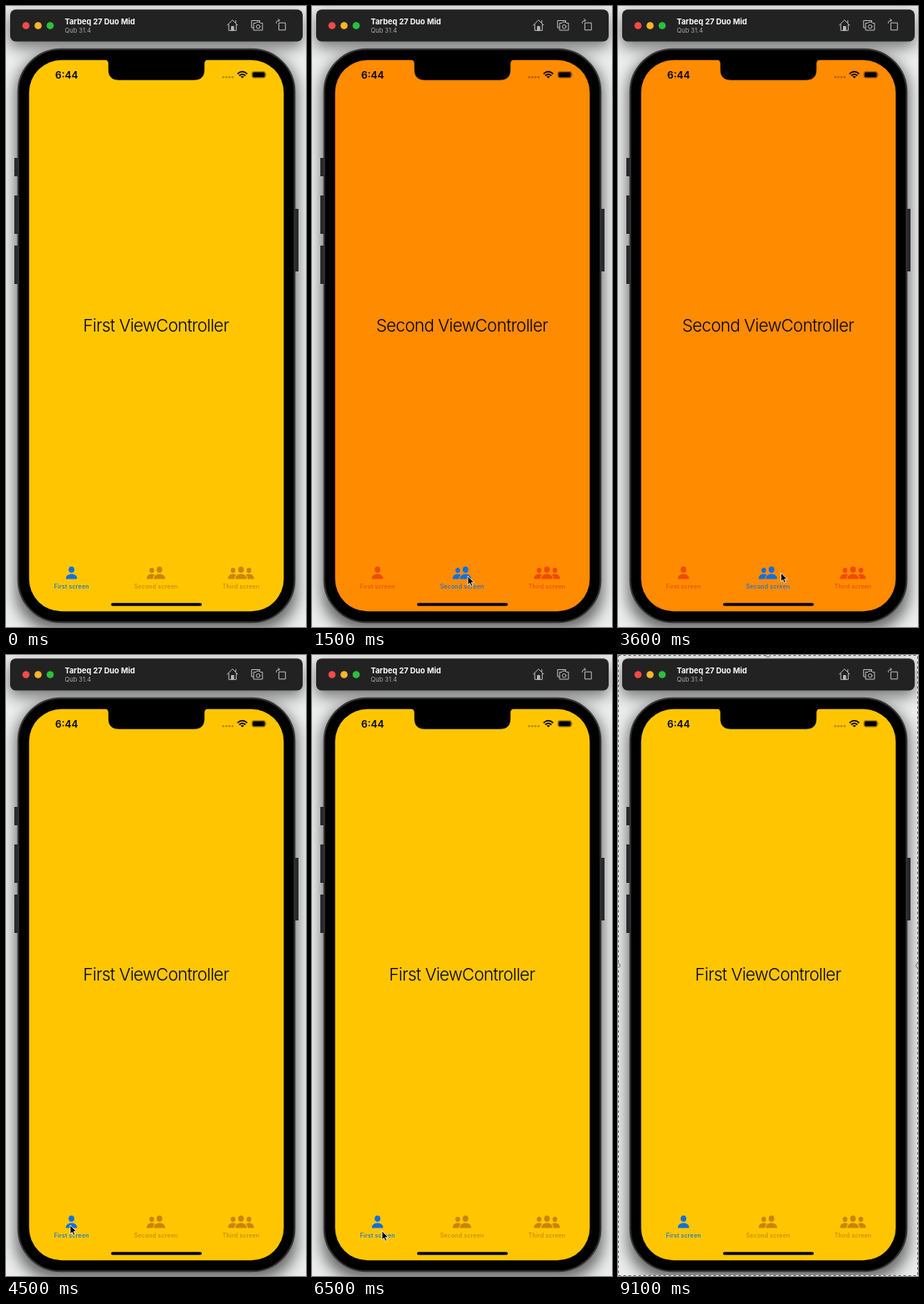
An HTML page that plays this animation: 360 by 744 pixels, repeating every 9.6 s.

```html
<!DOCTYPE html>
<html lang="en">
<head>
<meta charset="utf-8">
<title>Tab bar demo</title>
<style>
  html, body { margin: 0; width: 100%; height: 100%; overflow: hidden; background: #eceded; }
  svg { display: block; width: 360px; height: 744px; font-family: Inter, Roboto, sans-serif; }
  .screen { fill: var(--bg); }
  .heading { font-size: 20.5px; font-weight: 300; letter-spacing: -.029em; text-anchor: middle; }
  .tab { fill: var(--off); font-size: 7px; font-weight: 500; letter-spacing: .2px; text-anchor: middle; }
  .tab.active { fill: var(--on); }
  .tools { fill: none; stroke: #b9b9b9; stroke-width: 1; stroke-linejoin: round; stroke-linecap: round; }
</style>
</head>
<body>
<svg id="stage" viewBox="0 0 360 744">
  <defs>
    <filter id="blur" filterUnits="userSpaceOnUse" x="-40" y="-40" width="440" height="824">
      <feGaussianBlur stdDeviation="9"/>
    </filter>
    <path id="torso" d="M-6.8 10.8C-6.8 7.5-4 5.2 0 5.2S6.8 7.5 6.8 10.8Q6.8 11.3 6 11.3H-6Q-6.8 11.3-6.8 10.8Z"/>
    <g id="person"><ellipse rx="3.4" ry="3.8"/><use href="#torso"/></g>
    <g id="neighbor">
      <ellipse cx="-9.5" cy=".8" rx="2.8" ry="3.1"/>
      <path d="M-15.6 10.7C-15.6 7.4-13 5.3-9.5 5.3Q-7.5 5.3-6 6.2Q-8 8.2-8 11.3H-15Q-15.6 11.3-15.6 10.7Z"/>
    </g>
  </defs>

  <rect width="360" height="744" fill="#eceded"/>
  <rect x="12" y="58" width="337" height="690" rx="46" opacity=".58" filter="url(#blur)"/>
  <rect x="4" y="10" width="352" height="40" rx="8" opacity=".5" filter="url(#blur)"/>

  <rect x="5" y="4.3" width="351" height="38.2" rx="6.5" fill="#222223"/>
  <circle cx="24" cy="23.5" r="4.3" fill="#fb4a47"/>
  <circle cx="38.5" cy="23.5" r="4.3" fill="#fdb429"/>
  <circle cx="53" cy="23.5" r="4.3" fill="#2bc13b"/>
  <text x="70.5" y="22" font-size="9.2" font-weight="700" fill="#fff">Tarbeq 27 Duo Mid</text>
  <text x="70.5" y="32.3" font-size="7.5" fill="#a9a9a9">Qub 31.4</text>
  <g class="tools">
    <path d="M265.5 23L271.8 16.8L278 23M267.3 22V29.3H276.3V22M275.8 20V17.5"/>
    <path d="M270.5 29V24.5H273.2V29Z" fill="#b9b9b9"/>
    <path d="M297 26H294.7V17.5H304.5V19.5M297.5 20.5H300L301 19.2H304.2L305.2 20.5H307.8V29H297.5Z"/>
    <circle cx="302.6" cy="24.7" r="2.2"/>
    <path d="M327.8 20.2H335.3V28.8H327.8ZM324.3 20.5Q324 17.2 328 17.2M326.7 15.6L328.3 17.2L326.7 18.8"/>
  </g>

  <path d="M10 182h5v22h-5zM10 227h5v46h-5zM10 287h5v46h-5zM346 243h5v75h-5z" fill="#29292b"/>
  <rect x="14.7" y="51.7" width="331.6" height="686.6" rx="51" fill="#000" stroke="#333335" stroke-width="2"/>
  <rect class="screen" x="27.7" y="64.7" width="305.6" height="660.6" rx="39"/>
  <path d="M118.5 64Q122.8 65 122.8 69V76Q122.8 88.8 135.5 88.8H225.5Q238.2 88.8 238.2 76V69Q238.2 65 242.5 64Z"/>

  <text x="59" y="87" font-size="12" font-weight="600">6:44</text>
  <g opacity=".3">
    <circle cx="260.7" cy="85.3" r="1.3"/><circle cx="264.4" cy="85.3" r="1.3"/>
    <circle cx="268.1" cy="85.3" r="1.3"/><circle cx="271.8" cy="85.3" r="1.3"/>
  </g>
  <g fill="none" stroke="#000" stroke-width="1.7">
    <path d="M277.8 81.3Q283.6 76 289.4 81.3M279.9 83.5Q283.6 80.2 287.3 83.5"/>
    <path d="M282 84.6H285.2L283.6 86.2Z" fill="#000" stroke-width=".7"/>
  </g>
  <rect x="294.9" y="78.4" width="16.6" height="7.8" rx="2.4" fill="none" stroke="#000" stroke-opacity=".4" stroke-width=".8"/>
  <rect x="295.7" y="79.2" width="15" height="6.2" rx="1.6"/>
  <path d="M312.5 81Q314 82.3 312.5 83.6Z" opacity=".5"/>

  <text id="heading" class="heading" x="180" y="389.7"></text>

  <g class="tab">
    <use href="#person" x="78.6" y="675.3"/>
    <text x="78.7" y="697.6">First screen</text>
  </g>
  <g class="tab">
    <use href="#neighbor" x="184.4" y="675.3"/><use href="#person" x="184.2" y="675.3"/>
    <text x="180" y="697.6">Second screen</text>
  </g>
  <g class="tab">
    <use href="#neighbor" x="282" y="675.3"/><use href="#person" x="282" y="675.3"/>
    <use href="#neighbor" transform="translate(282 675.3) scale(-1 1)"/>
    <text x="282" y="697.6">Third screen</text>
  </g>
  <rect id="homeBar" x="126" y="715.2" width="109" height="3.6" rx="1.8"/>

  <path id="cursor" d="M0 0V10.6L2.4 8.4L4 12.2L5.9 11.4L4.3 7.7H7.6Z" stroke="#fff" stroke-width=".8"/>

  <g id="selection" fill="none">
    <rect x=".5" y=".5" width="359" height="743" stroke="#f4f4f4"/>
    <rect x=".5" y=".5" width="359" height="743" stroke="#666" stroke-dasharray="3 3"/>
    <g fill="#ddd" stroke="#777">
      <circle cx="180" cy="0" r="2.5"/><circle cx="180" cy="744" r="2.5"/>
      <circle cx="0" cy="372" r="2.5"/><circle cx="360" cy="372" r="2.5"/>
    </g>
  </g>
</svg>
<script>
const LOOP = 9600, STEP = 100;
const byId = id => document.getElementById(id);
const stage = byId('stage'), tabs = document.querySelectorAll('.tab');

const screens = [
  { name: 'First', bg: '#ffc600', off: '#c98509', on: '#0d70e0', bar: '#000' },
  { name: 'Second', bg: '#ff8b00', off: '#f04c00', on: '#0d70e0', bar: '#000' },
  { name: 'Third', bg: '#ff322c', off: '#e6000c', on: '#1b68d8', bar: '#3a2424' }
];
// [time, screen index]
const taps = [[0, 0], [1500, 1], [2400, 2], [3600, 1], [4500, 0], [5400, 2], [6500, 0]];
// [time, x, y] of the pointer tip
const path = [
  [400, 326, 690], [800, 191, 684], [900, 191, 684], [1100, 187, 683],
  [1700, 187, 683], [2100, 288, 687], [2700, 288, 687], [3100, 203, 675],
  [3200, 203, 675], [3400, 195.5, 679], [3600, 195.5, 679], [4000, 103, 681],
  [4100, 103, 681], [4300, 77, 683], [4500, 77, 683], [5200, 267, 682],
  [5500, 267, 682], [6300, 84, 690], [7900, 84, 690]
];

function pointerAt(t) {
  const i = path.findIndex(p => p[0] > t);
  if (i < 1) return null;
  const [t0, x0, y0] = path[i - 1], [t1, x1, y1] = path[i];
  const u = (t - t0) / (t1 - t0), k = u * u * (3 - 2 * u);
  return [x0 + (x1 - x0) * k, y0 + (y1 - y0) * k];
}

function draw(t) {
  const index = taps.filter(tap => tap[0] <= t).pop()[1];
  const screen = screens[index];
  for (const key of ['bg', 'off', 'on']) stage.style.setProperty('--' + key, screen[key]);
  byId('heading').textContent = screen.name + ' ViewController';
  byId('homeBar').setAttribute('fill', screen.bar);
  tabs.forEach((tab, i) => tab.classList.toggle('active', i === index));

  const tip = pointerAt(t);
  byId('cursor').style.display = tip ? '' : 'none';
  if (tip) byId('cursor').setAttribute('transform', `translate(${tip})`);
  byId('selection').style.display = t >= 7900 ? '' : 'none';
}

const start = performance.now();
function tick() {
  const t = (performance.now() - start) % LOOP;
  draw(Math.floor(t / STEP) * STEP);
  requestAnimationFrame(tick);
}
tick();
</script>
</body>
</html>
```
